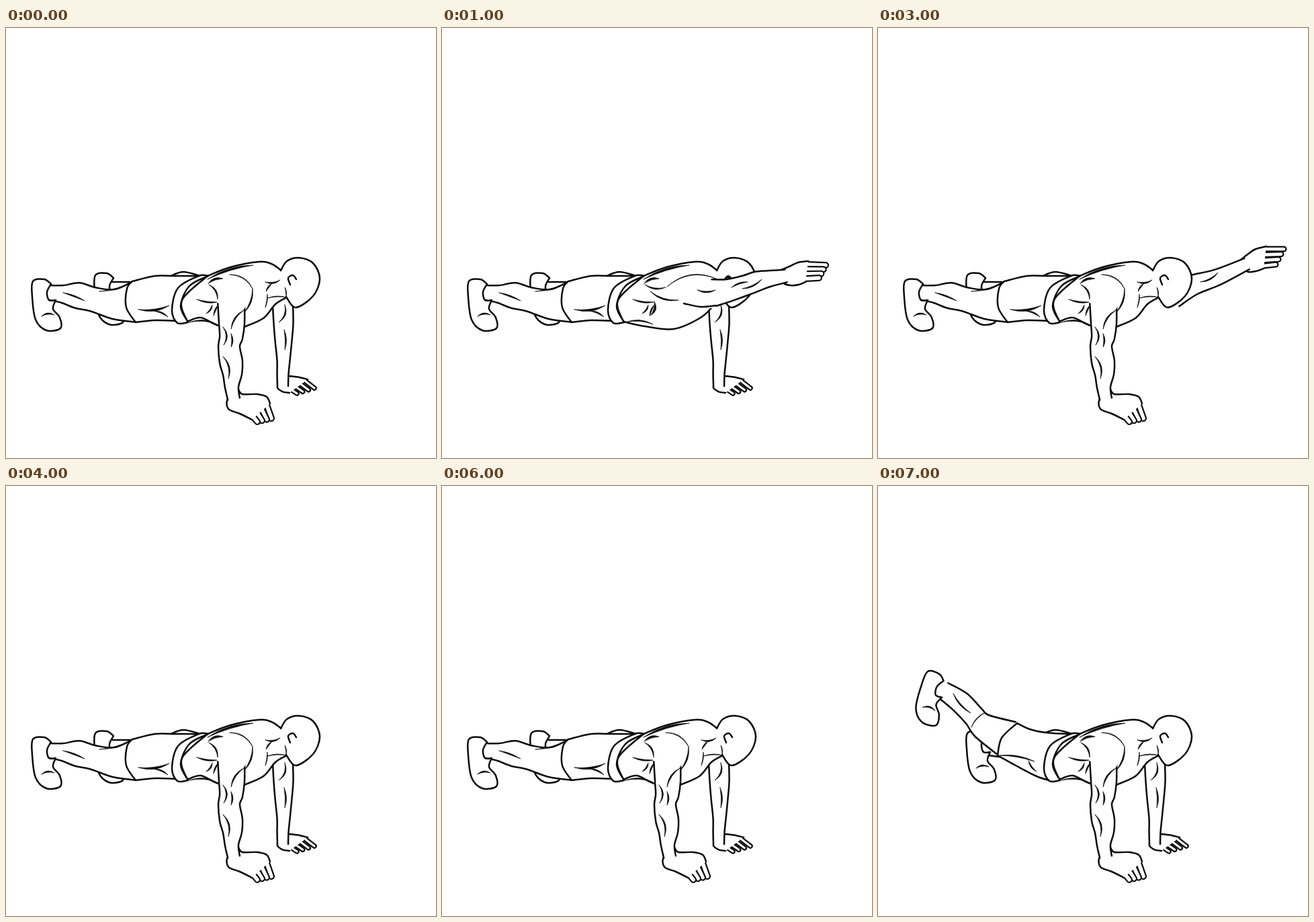
An HTML page for the animation above (8 s loop, 640 px wide and 640 px high).

```html
<!DOCTYPE html>
<html lang="en">
<head>
<meta charset="utf-8">
<title>Plank exercise</title>
<style>
  html, body { margin: 0; width: 100%; height: 100%; overflow: hidden; background: #fff; }
  svg { display: block; width: 100%; height: 100%; }
  path { fill: none; stroke: #0a0a0a; stroke-width: 2.5; stroke-linecap: round; stroke-linejoin: round; }
  .solid { fill: #fff; }
  .patch { fill: #fff; stroke: none; }
  .mark { fill: #0a0a0a; stroke-width: .7; }
</style>
</head>
<body>
<svg id="stage" viewBox="0 0 640 640"></svg>
<script>
const LOOP = 8000, STEPS = 8;
const stage = document.getElementById('stage');
const svg = (tag, attrs) => {
  const node = document.createElementNS('http://www.w3.org/2000/svg', tag);
  for (const key in attrs) node.setAttribute(key, attrs[key]);
  return node;
};
const mix = (a, b, t) => a.map((v, k) => v + (b[k] - v) * t);

// Smooth curve through points, without the leading move.
function curve(pts) {
  return pts.slice(1).map((c, i) => {
    const b = pts[i], a = pts[i - 1] || b, e = pts[i + 2] || c;
    const c1 = b.map((v, k) => v + (c[k] - a[k]) / 6);
    const c2 = c.map((v, k) => v - (e[k] - b[k]) / 6);
    return `C${c1} ${c2} ${c}`;
  }).join('');
}

// Curve from text; "|" marks a sharp corner.
function smooth(text) {
  const runs = text.split('|').map(run => run.trim().split(' ').map(p => p.split(',').map(Number)));
  return 'M' + runs[0][0] + runs.map((run, i) => curve(i ? [runs[i - 1].at(-1), ...run] : run)).join('');
}
const solid = text => [['solid', smooth(text)]];
const line = text => [['line', smooth(text)]];

// Tapered brush mark that bends to the left of its direction.
function mark(x1, y1, x2, y2, bend, width = 2) {
  const len = Math.hypot(x2 - x1, y2 - y1);
  const control = by => [(x1 + x2) / 2 + (y2 - y1) / len * by * 2, (y1 + y2) / 2 - (x2 - x1) / len * by * 2];
  return [['mark', `M${x1},${y1}Q${control(bend + width / 2)} ${x2},${y2}Q${control(bend - width / 2)} ${x1},${y1}`]];
}

// Two contours at a varying distance from a spine of [x, y, radius].
function limb(...spine) {
  const side = sign => spine.map(([x, y, r], i) => {
    const a = spine[i - 1] || spine[i], b = spine[i + 1] || spine[i];
    const dx = b[0] - a[0], dy = b[1] - a[1], k = sign * r / Math.hypot(dx, dy);
    return [x + dy * k, y - dx * k];
  });
  const left = side(1), right = side(-1), back = [...right].reverse();
  return [
    ['patch', `M${left[0]}${curve(left)}L${back[0]}${curve(back)}Z`],
    ['line', `M${left[0]}${curve(left)}`],
    ['line', `M${right[0]}${curve(right)}`]
  ];
}

// Four capsule fingers spread between two knuckles and two tips, under a palm.
function hand(knuckles, tips, width, palm) {
  const fingers = [0, 1, 2, 3].flatMap(i => {
    const d = `M${mix(...knuckles, i / 3)}L${mix(...tips, i / 3)}`;
    return [
      ['line', d, { style: `stroke-width:${width}` }],
      ['line', d, { style: `stroke:#fff;stroke-width:${width - 4.4}` }]
    ];
  });
  return [...fingers, ...solid(palm)];
}

const shoe = transform => [
  ...solid('67,381 57,374 40,377 39,400 44,434 60,450 81,447 80,431 70,418 74,405 | 64,405 61,393 67,381'),
  ...mark(53,429, 72,427, 3)
].map(([kind, d]) => [kind, d, { transform }]);

// Adds a body part that is visible only in the steps accepted by `shown`.
function part(shown, ...shapes) {
  const group = svg('g', {});
  for (const [kind, d, extra] of shapes.flat()) group.append(svg('path', { class: kind, d, ...extra }));
  stage.append(group);
  group.animate(Array.from({ length: STEPS + 1 }, (_, i) => ({
    offset: i / STEPS,
    visibility: shown(i % STEPS) ? 'visible' : 'hidden',
    easing: 'step-end'
  })), { duration: LOOP, iterations: Infinity });
  return group;
}

const always = () => true;
const only = n => i => i === n;
const except = n => i => i !== n;
const NEAR_ARM = 1, FAR_ARM = 3, FAR_LEG = 5, NEAR_LEG = 7;

const raisedLeg = [
  limb([97,304,13], [122,321,16], [143,343,16], [155,357,19], [192,376,28]),
  shoe('translate(19.5 -96) rotate(22 60 412)'),
  mark(112,309, 138,338, -3),
  mark(139,359, 160,337, 3, 1)
];

// Far arm
part(except(FAR_ARM),
  hand([[446,526], [421,536]], [[459,536], [433,544]], 7.5, '449,523 437,520 421,518 | 404,533 411,541 422,543'),
  limb([412,412,15], [413,440,14.5], [413,465,12.5], [413,495,9.5], [412,515,8.5], [412,533,8]),
  mark(415,412, 406,438, 5),
  mark(414,449, 415,479, 2));
part(only(FAR_ARM),
  hand([[578,329], [574,354]], [[604,329], [592,352]], 9, '578,325 562,329 550,337 540,345 | 549,362 562,362 574,358'),
  limb([440,396,20], [470,382,15], [505,371,12], [549,351,9]),
  mark(480,378, 506,364, -3));

// Far leg
part(except(FAR_LEG), limb([158,389,11], [188,391,13]), shoe('translate(93 -9)'));
part(only(FAR_LEG),
  limb([249,382,25], [290,393,25]),
  mark(264,359, 238,400, -5, 3),
  ...raisedLeg).setAttribute('transform', 'translate(57 6)');
part(always, solid('245,369 264,363 289,369'));

// Near leg and shorts
part(except(NEAR_LEG),
  limb([66,394,11], [84,396,13], [106,398,19], [130,404,18], [160,411,22], [190,408,30]),
  shoe(''),
  mark(85,394, 117,406, 1),
  mark(139,392, 188,378, -3, 1),
  solid('257,436 222,435 193,438 | 179,416 180,388 188,377 | 222,369 250,369 285,369'),
  mark(197,419, 243,413, -4, 3),
  mark(220,421, 241,430, 2));
part(only(NEAR_LEG),
  ...raisedLeg,
  solid('258,439 236,432 205,416 178,401 | 184,375 207,353 | 226,362 250,367 285,369'),
  mark(181,401, 233,410, 3),
  mark(224,409, 236,425, -2));

// Torso
const back = '| 262,405 300,369 | 334,356 376,348 395,351 410,361';
part(except(NEAR_ARM),
  solid('418,401 401,411 383,432 354,445 | 317,443 290,431 270,437' + back),
  mark(389,402, 418,401, 2, 1),
  mark(386,416, 389,396, -1, 1));
part(only(NEAR_ARM), solid('405,412 385,431 345,448 302,444 270,437' + back));
part(always,
  solid('301,369 273,384 260,414 271,438 | 255,439 247,420 256,387 287,369 301,369'),
  mark(273,438, 314,441, 4),
  mark(300,374, 368,353, 4, 3),
  mark(386,378, 408,375, -3),
  mark(396,380, 387,392, -1),
  mark(301,380, 323,373, 3, 3),
  mark(284,404, 315,408, -2),
  mark(298,425, 307,412, -2),
  mark(309,428, 316,412, 1));

// Head
part(always, solid('409,361 418,347 436,342 457,350 467,373 457,399 431,416 417,400'));
part(except(NEAR_ARM), line('423,382 420,372 427,368 432,374'), mark(417,400, 415,386, -1, 1));

// Near arm
part(except(NEAR_ARM),
  hand([[388,561], [362,571]], [[395,581], [374,586]], 10, '393,559 388,549 374,545 352,545 346,538 | 330,552 331,567 348,574 366,583'),
  limb([335,405,20], [336,440,19], [335,461,17], [332,474,16], [335,497,17], [337,516,14], [336,535,10], [339,552,9]),
  [['patch', smooth('314,409 312,388 340,368 366,385 355,418')]],
  mark(302,382, 315,404, 4),
  mark(333,367, 367,388, 6, 1),
  mark(367,388, 354,424, 4),
  mark(354,420, 335,448, -4),
  mark(323,445, 324,472, 5),
  mark(335,455, 335,475, 2),
  mark(323,489, 331,522, 5));
part(only(NEAR_ARM),
  hand([[545,352], [543,373]], [[571,353], [561,372]], 10, '545,347 530,349 519,354 505,360 | 508,379 519,383 531,382 541,378'),
  [['patch', smooth('312,394 335,386 376,367 410,374 | 408,413 385,415 350,407')]],
  limb([405,394,20], [428,390,16.5], [452,383,15], [469,377,14.5], [487,373,12], [512,369,9.5]),
  line('408,413 385,415 360,410'),
  mark(302,382, 333,386, -4),
  mark(335,385, 410,374, 12, 1),
  mark(310,392, 352,405, -5),
  mark(316,407, 310,428, 4, 3),
  mark(380,390, 407,390, -3),
  mark(447,388, 476,374, -3),
  mark(431,386, 455,378, 2),
  mark(420,374, 432,374, 4, 4));
</script>
</body>
</html>
```
